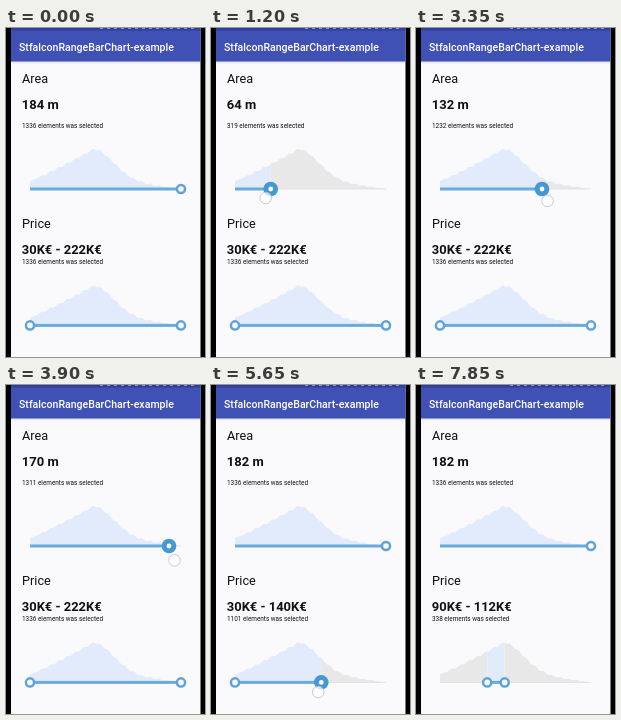
An HTML page with a canvas that plays this animation: 199 px wide and 329 px high, repeating every 8000 ms.

```html
<!DOCTYPE html>
<html lang="en">
<head>
<meta charset="utf-8">
<title>Range bar chart</title>
<style>
  html, body { margin: 0; width: 100%; height: 100%; overflow: hidden; background: #000; }
  canvas { display: block; width: 199px; height: 329px; }
</style>
</head>
<body>
<canvas id="stage" width="199" height="329"></canvas>
<script>
const ctx = document.getElementById('stage').getContext('2d');
const LOOP = 8000, STEP = 50;
const LEFT = 24, RIGHT = 175, PEAK = 88;
const AREA_BASE = 161, PRICE_BASE = 297.4;

// Key points of the running total: x and number of elements to its left
const totals = [
  [LEFT, 0], [28, 6], [71.2, 432], [77, 554],
  [88.7, 770], [109, 1090], [126, 1232], [RIGHT, 1336]
];

const ramp = (t, from, to) => Math.min(1, Math.max(0, (t - from) / (to - from)));
const easeIn = (t, from, to, power) => ramp(t, from, to) ** power;
const easeOut = (t, from, to, power) => 1 - (1 - ramp(t, from, to)) ** power;
const visible = (t, from, to, rise) => ramp(t, from, from + rise) * (1 - ramp(t, to, to + 200));

function totalAt(x) {
  const i = Math.max(1, totals.findIndex(([end]) => x <= end));
  const [x0, n0] = totals[i - 1], [x1, n1] = totals[i];
  return n0 + (n1 - n0) * ramp(x, x0, x1);
}

const countText = (a, b) => `${Math.round(totalAt(b) - totalAt(a))} elements was selected`;

// A steady climb to the peak, then a bell with a long tail
function height(x) {
  const ripple = 0.8 * Math.sin(x * 0.75) * ramp(x, LEFT, 40) * (1 - ramp(x, 140, RIGHT));
  if (x < PEAK) return 8 + 32 * ramp(x, LEFT, PEAK) ** 1.1 + ripple;
  const d = x - PEAK;
  return 40 * (0.7 * Math.exp(-((d / 28) ** 2)) + 0.3 * (1 - d / (RIGHT - PEAK))) + ripple;
}

function rect(x, y, w, h, color) {
  ctx.fillStyle = color;
  ctx.fillRect(x, y, w, h);
}

function disc(x, y, r, color) {
  ctx.fillStyle = color;
  ctx.beginPath();
  ctx.arc(x, y, r, 0, Math.PI * 2);
  ctx.fill();
}

function text(string, x, y, size, weight = 400, color = '#111') {
  ctx.font = `${weight} ${size}px Roboto, sans-serif`;
  ctx.fillStyle = color;
  ctx.fillText(string, x, y);
}

function thumb(x, y, press) {
  disc(x, y, 5.3 + 2 * press, press > 0.5 ? '#4598d2' : '#5fa3d9');
  disc(x, y, 2.8 - 0.4 * press, '#fafafc');
}

function touch(x, y, alpha) {
  ctx.save();
  ctx.globalAlpha = alpha;
  disc(x, y, 5.8, 'rgba(255,255,255,.75)');
  ctx.strokeStyle = '#b9bdc3';
  ctx.lineWidth = 0.8;
  ctx.stroke();
  ctx.restore();
}

function silhouette(base, color, from, to) {
  if (to <= from) return;
  ctx.beginPath();
  ctx.moveTo(from, base);
  for (let x = from; x < to; x++) ctx.lineTo(x, base - height(x));
  ctx.lineTo(to, base - height(to));
  ctx.lineTo(to, base);
  ctx.fillStyle = color;
  ctx.fill();
}

function chart(base, from, to) {
  silhouette(base, '#e8e8e9', LEFT, from);
  silhouette(base, '#e2ebfc', from, to);
  silhouette(base, '#e8e8e9', to, RIGHT);
  rect(LEFT, base - 0.5, RIGHT - LEFT, 1, '#e4e4e6');
  rect(from, base - 1.5, to - from, 3, '#6aabdd');
}

function frame() {
  rect(0, 0, 199, 329, '#000');
  rect(5, 0, 189.5, 329, '#fafafc');
  rect(5, 0, 189.5, 3, '#303f9f');
  for (let x = 94; x < 190; x += 7) rect(x, 0, 3, 1, '#8d97cb');
  rect(5, 2.5, 189.5, 31, '#3f51b5');
  const shade = ctx.createLinearGradient(0, 33.5, 0, 36);
  shade.addColorStop(0, 'rgba(0,0,0,.12)');
  shade.addColorStop(1, 'rgba(0,0,0,0)');
  rect(5, 33.5, 189.5, 2.5, shade);
  text('StfalconRangeBarChart-example', 13, 22.5, 10.55, 500, '#fff');
}

// Three strokes of one long press: down, partly back, up to the end
function areaSection(t) {
  const x = RIGHT - 125 * easeOut(t, 100, 1400, 1.365)
    + 62 * easeOut(t, 1650, 2700, 1.192) + 63 * easeIn(t, 3000, 4050, 1.369);
  const meters = t < 150 ? 184 : Math.floor(28 + 154.5 * ramp(x, LEFT, RIGHT));
  text('Area', 16, 55, 12.7);
  text(`${meters} m`, 15.8, 81, 13, 700);
  text(countText(LEFT, x), 16, 100, 6.4);
  chart(AREA_BASE, LEFT, x);
  thumb(x, AREA_BASE, visible(t, 100, 4200, 200));
  const lead = -5 + 10.5 * ramp(t, 1650, 1800);
  touch(x + lead, 170 + 6 * ramp(t, 2700, 4050), visible(t, 50, 4200, 50));
}

function priceSection(t) {
  const slide = ramp(t, 5050, 5850);
  const a = LEFT + 47.2 * easeIn(t, 6650, 7600, 1.584);
  const b = RIGHT - 86.3 * slide;
  const price = x => Math.round(30 + 192 * ramp(x, LEFT, RIGHT)) + 'K€';
  text('Price', 16, 200, 12.7);
  text(`${price(a)} - ${price(b)}`, 15.8, 226, 12.95, 700);
  text(countText(a, b), 16, 236, 6.4);
  chart(PRICE_BASE, a, b);
  thumb(a, PRICE_BASE, visible(t, 6850, 7650, 150));
  thumb(b, PRICE_BASE, visible(t, 5050, 6100, 200));
  const arc = 12 * slide + 10 * Math.sin(Math.PI * slide);
  touch(b - 3, 291 + arc, visible(t, 4950, 6100, 50));
  touch(a + 1.5, 299 + 5 * ramp(t, 6850, 7600), visible(t, 6600, 7650, 50));
}

function draw() {
  const t = Math.floor(performance.now() % LOOP / STEP) * STEP;
  frame();
  areaSection(t);
  priceSection(t);
  requestAnimationFrame(draw);
}
draw();
</script>
</body>
</html>
```
